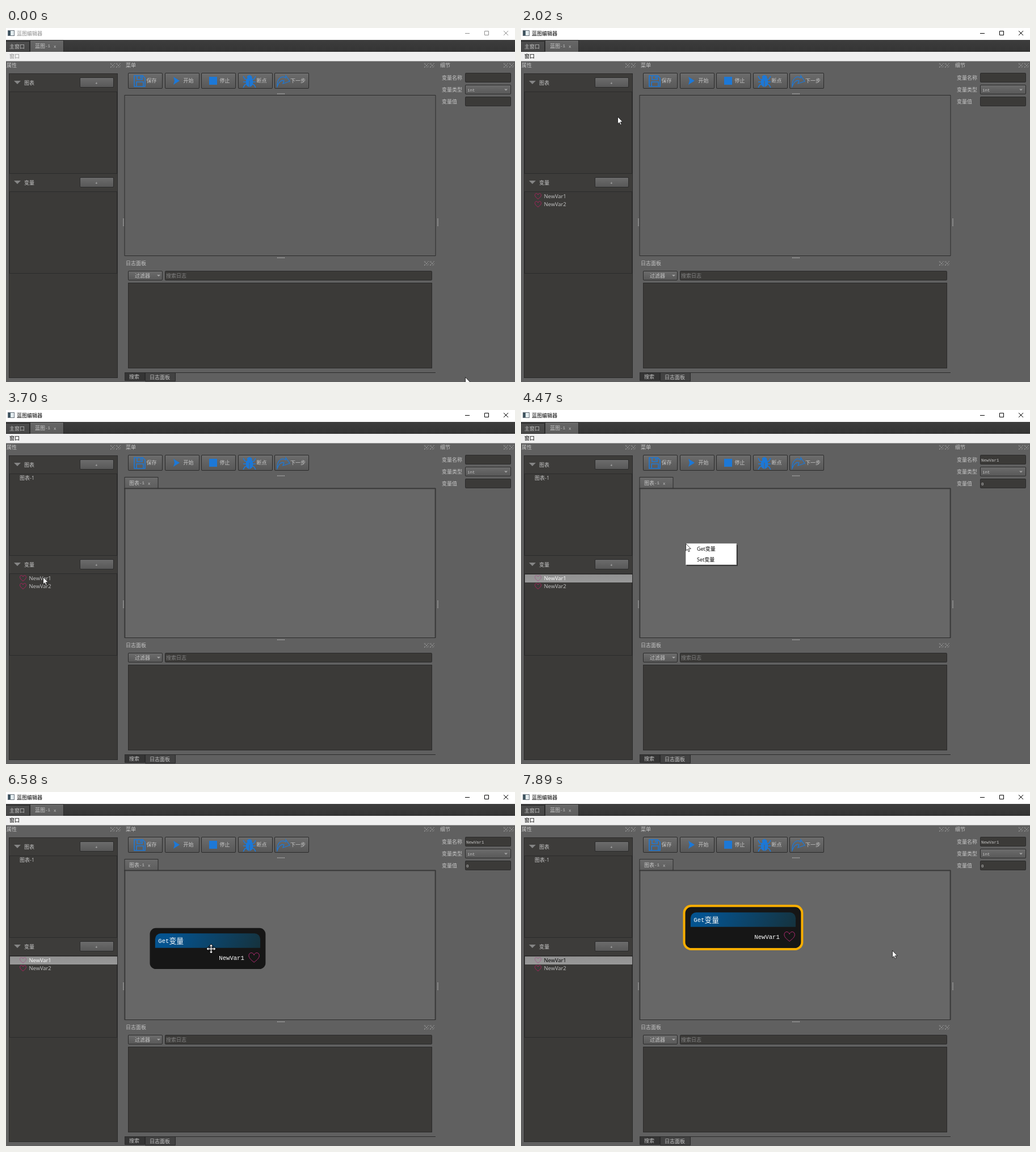
These frames come from a looping animation (897x624 px, 8000 ms). An HTML page with a canvas:

```html
<!DOCTYPE html>
<html lang="zh-CN">
<head>
<meta charset="utf-8">
<style>
html, body { margin: 0; width: 100%; height: 100%; overflow: hidden; background: #606060; }
canvas { display: block; }
</style>
</head>
<body>
<canvas id="stage" width="897" height="624"></canvas>
<script>
const ctx = document.getElementById('stage').getContext('2d');
const LOOP = 8000;
const CJK = '"Noto Sans CJK SC", "Noto Sans CJK", sans-serif';
const SANS = `"Open Sans", ${CJK}`;
const MONO = '"Liberation Mono", monospace';
const BACK = '#606060', DARK = '#3b3a38', EDGE = '#2b2b2b', LIGHT = '#c6c6c6', BLUE = '#1d78d6';

// Moments at which the interface reacts
const CUE = {
  activate: 1150, firstVar: 1230, pressAgain: 1540, secondVar: 1710, pressGraph: 2540, graph: 2620,
  select: 3780, details: 3860, menu: 4400, hover: 4620, node: 5240, zoom: 6100, grab: 6650, leave: 7290
};

// Pointer trips: each starts where the last one ended; bow bends the path sideways
const START = { x: 809, y: 615 };
const drag = { from: CUE.grab, to: 6990, x: 397, y: 239 };
const TRIPS = [
  { from: 20, to: 1000, x: 153, y: 266, bow: 330 },
  { from: CUE.secondVar, to: 2460, x: 155, y: 99, bow: 17 },
  { from: 2860, to: 3700, x: 65, y: 294, bow: -75 },
  { from: 3900, to: 4390, x: 290, y: 235 },
  { from: CUE.hover, to: 4780, x: 318, y: 243 },
  { from: 5420, to: 6020, x: 388, y: 239 },
  { from: 6350, to: 6560, x: 361, y: 276 },
  drag,
  { from: 6990, to: 7190, x: 470, y: 252 },
  { from: CUE.leave - 50, to: 7890, x: 654, y: 279 }
];

function progress(t, { from, to }) {
  const p = Math.min(1, Math.max(0, (t - from) / (to - from)));
  return p * (2 - p);
}

function pointerAt(t) {
  let { x, y } = START;
  for (const trip of TRIPS) {
    const p = progress(t, trip), dx = trip.x - x, dy = trip.y - y;
    const bend = (trip.bow || 0) * 4 * p * (1 - p) / Math.hypot(dx, dy);
    x += dx * p - dy * bend;
    y += dy * p + dx * bend;
    if (p < 1) break;
  }
  return [Math.round(x), Math.round(y)];
}

const between = (t, a, b) => t >= a && t < b;

function rect(x, y, w, h, color) {
  ctx.fillStyle = color;
  ctx.fillRect(x, y, w, h);
}

function round(x, y, w, h, r, fill) {
  ctx.fillStyle = fill;
  ctx.beginPath();
  ctx.roundRect(x, y, w, h, r);
  ctx.fill();
}

function framed(x, y, w, h, fill, r = 0, edge = EDGE) {
  round(x, y, w, h, r, edge);
  round(x + 1, y + 1, w - 2, h - 2, Math.max(0, r - 1), fill);
}

function vertical(y, h, top, bottom) {
  const g = ctx.createLinearGradient(0, y, 0, y + h);
  g.addColorStop(0, top);
  g.addColorStop(1, bottom);
  return g;
}

function stroke(path, color, width = 1) {
  ctx.strokeStyle = color;
  ctx.lineWidth = width;
  ctx.stroke(new Path2D(path));
}

function fill(path, color) {
  ctx.fillStyle = color;
  ctx.fill(new Path2D(path));
}

function text(s, x, cy, color = LIGHT, size = 9, family = SANS) {
  ctx.font = `${size}px ${family}`;
  ctx.fillStyle = color;
  ctx.fillText(s, x, cy + size * 0.37);
}

// Latin letters take half the width of a Chinese character
function gridText(s, x, cy, color = LIGHT, size = 9) {
  for (const run of s.match(/[\x20-\x7e]+|[^\x20-\x7e]+/g)) {
    const latin = run.charCodeAt(0) < 128;
    ctx.font = latin ? `${size / 1.2}px ${MONO}` : `${size}px ${CJK}`;
    ctx.fillStyle = color;
    ctx.fillText(run, x, cy + size * (latin ? 0.31 : 0.37));
    x += run.length * size * (latin ? 0.5 : 1);
  }
}

function button(x, y, w, h, pressed) {
  framed(x, y, w, h, vertical(y, h, pressed ? '#565656' : '#6d6d6d', '#575757'), 2);
}

function field(x, y, w, h) { framed(x, y, w, h, DARK, 2); }

function dropArrow(x, y, r, color = '#a5a5a5') {
  fill(`M${x - r} ${y}h${2 * r}l${-r} ${r}Z`, color);
}

function heart(cx, cy, w, color, width = 1) {
  const r = w / 2;
  ctx.save();
  ctx.translate(cx, cy);
  ctx.scale(r, r);
  for (const side of [1, -1]) {
    ctx.scale(side, 1);
    stroke('M0 .92C.6 .45 1 .1 1-.35C1-1 .2-1.1 0-.45', color, width / r);
  }
  ctx.restore();
}

function dockTitle(label, x, y, right) {
  text(label, x, y);
  for (const left of [right - 19, right - 9])
    for (let i = 0; i < 8; i += 2) {
      rect(left + i, y - 4 + i, 1, 1, '#b0b0b0');
      rect(left + 7 - i, y - 4 + i, 1, 1, '#b0b0b0');
      rect(left + i, i % 4 ? y - 4 : y + 3, 1, 1, '#8c8c8c');
      rect(i % 4 ? left : left + 7, y - 4 + i, 1, 1, '#8c8c8c');
    }
}

function grip(x, y, dx, dy) {
  for (let i = 0; i < 7; i++) rect(x + i * dx, y + i * dy, dx ? 1 : 2, dx ? 2 : 1, '#a8a8a8');
}

function drawTitleBar(active) {
  const ink = active ? '#000' : '#8e8e8e';
  rect(0, 0, 897, 21, '#fff');
  framed(3, 4, 12, 10, '#e4ecef', 0, '#66707a');
  rect(4, 5, 4, 8, '#3f5560');
  text('蓝图编辑器', 19, 9.5, ink, 9, CJK);
  stroke('M809 9.5h8M843.5 5.5h7v7h-7ZM877 5l8 8m0-8l-8 8', ink);

  rect(0, 21, 897, 21, vertical(21, 21, '#3d3d3d', '#343434'));
  framed(-1, 23, 43, 19, vertical(23, 19, '#4d4d4d', '#464646'), 1);
  framed(42, 21, 60, 23, vertical(21, 21, '#686868', '#5c5c5c'), 1);
  text('主窗口', 6, 32.5);
  gridText('蓝图-1', 51, 31.5);
  gridText('x', 84, 32);
  rect(0, 42, 897, 16.5, '#f0f0f0');
  text('窗口', 6, 49.5, ink);
}

function drawToolbar() {
  dockTitle('菜单', 211, 66, 756);
  ['保存', '开始', '停止', '断点', '下一步'].forEach((label, i) => {
    const x = Math.round(215 + i * 64.6);
    button(x, 79, 61, 28);
    text(label, x + (i < 4 ? 32.5 : 28), 93);
  });
  stroke('M226 84h15l4 4v15h-19ZM231 84v7h9v-7M230 103v-8h12v8M237.5 85v4', BLUE, 1.6);
  fill('M295 86l11 7-11 7 2-7Z', BLUE);
  rect(358, 86, 14, 14, BLUE);
  drawBug(429, 93);
  stroke('M478 103C477 89 486 83 493 88V84L500 94 488 98 490 93C485 91 481 95 478 103Z', BLUE, 1.3);
}

function drawBug(cx, cy) {
  ctx.fillStyle = BLUE;
  ctx.beginPath();
  ctx.ellipse(cx, cy + 2.5, 6.5, 8.5, 0, 0, 7);
  ctx.ellipse(cx, cy - 6, 4.5, 4, 0, Math.PI, 0);
  ctx.fill();
  for (const side of [-1, 1])
    for (const rise of [-5, 0, 5])
      stroke(`M${cx} ${cy + 2 + rise / 2}l${side * 8} ${rise / 2}l${side * 3} ${rise}`, BLUE, 1.6);
  rect(cx - 0.5, cy, 1, 11, BACK);
}

function drawSidebar(t) {
  const varPressed = between(t, CUE.activate, CUE.firstVar) || between(t, CUE.pressAgain, CUE.secondVar);
  dockTitle('属性', 1, 66, 203);
  framed(5, 80, 192, 537, DARK);
  drawSection('图表', 80, between(t, CUE.pressGraph, CUE.graph));
  drawSection('变量', 256, varPressed);
  if (t >= CUE.graph) text('图表-1', 24, 119.5);
  const selected = t >= CUE.select;
  if (selected) rect(7, 290, 189, 14, vertical(290, 14, '#919191', '#999'));
  [CUE.firstVar, CUE.secondVar].forEach((born, i) => {
    if (t < born) return;
    const y = 296.5 + i * 14, hot = selected && i === 0;
    heart(30, y, 11, hot ? '#a0608a' : '#a8245c');
    text(`NewVar${i + 1}`, 40.5, y, !hot ? LIGHT : t < CUE.grab ? '#fff' : '#000', 9.4);
  });
}

function drawSection(label, y, pressed) {
  rect(6, y + 1, 190, 31, '#3d3c3a');
  framed(6, y + 32, 190, 145, DARK);
  dropArrow(20, y + 13, 6, '#858585');
  text(label, 32, y + 16.5);
  button(130, y + 7, 60, 18, pressed);
  gridText('+', 157, y + 17);
}

function drawDetails(filled) {
  dockTitle('细节', 765, 66, 896);
  ['变量名称', '变量类型', '变量值'].forEach((label, i) => {
    const y = 88 + i * 21;
    text(label, 768, y);
    (i === 1 ? button : field)(809, y - 9, 81, 17);
  });
  gridText('int', 813, 109);
  dropArrow(881, 107.5, 3);
  if (filled) {
    gridText('NewVar1', 811, 88);
    gridText('0', 811, 130);
  }
}

function drawLog() {
  dockTitle('日志面板', 211, 415, 756);
  button(215, 428, 61, 17);
  text('过滤器', 227, 436.5);
  dropArrow(269, 435, 3);
  field(280, 428, 471, 17);
  text('搜索日志', 282, 436.5, '#858585');
  framed(215, 449, 536, 151, DARK);
  rect(209, 607, 548, 1, EDGE);
  framed(209, 607, 36, 15, '#353535', 1);
  framed(245, 607, 54, 16, '#424242', 1);
  text('搜索', 217, 615);
  text('日志面板', 253, 615.5);
}

function drawView(open) {
  if (!open) return framed(208.5, 118, 549, 284, BACK, 1);
  framed(208.5, 118, 60, 22, vertical(118, 20, '#6b6b6b', '#5e5e5e'), 1);
  gridText('图表-1', 217, 128.5);
  gridText('x', 250, 129);
  framed(208.5, 137.5, 549, 264.5, '#484848', 1);
  rect(210.5, 139.5, 545, 261.5, '#676767');
}

function drawNode(t) {
  const scale = 1.19 ** (t < CUE.zoom ? 0 : t < CUE.zoom + 80 ? 1 : 2);
  const moved = progress(t, drag);
  ctx.save();
  ctx.translate(388 - 95 * scale + 36 * moved, 237 + 2 * scale - 37 * moved);
  ctx.scale(scale, scale);
  if (t >= CUE.grab) round(-2.8, -2.8, 149.6, 56.6, 10, '#f8ae00');
  round(0, 0, 144, 51, 7.5, '#161616');
  const g = ctx.createLinearGradient(30, 0, 125, 45);
  g.addColorStop(0, '#04538f');
  g.addColorStop(1, '#15333f');
  round(6.6, 6.7, 130.8, 18, [7, 7, 0, 0], g);
  gridText('Get变量', 10.5, 15.6, '#fff');
  gridText('NewVar1', 86, 36.6, '#fff');
  heart(129.7, 36.6, 13, '#b02c72', 1 / scale);
  ctx.restore();
}

function drawMenu(hover) {
  rect(292, 238, 90, 37, 'rgba(0,0,0,.45)');
  framed(290, 235, 90, 38, '#fff', 0, '#d0d0d0');
  if (hover) rect(291, 236, 88, 18, '#91c9f7');
  text('Get变量', 310, 245, '#000');
  text('Set变量', 310, 263.5, '#000');
}

function fourWays(paint) {
  for (let i = 0; i < 4; i++) {
    paint('M-.7 0V-5H-2.8L0-7.8 2.8-5H.7V0Z');
    ctx.rotate(Math.PI / 2);
  }
}

function drawPointer(t) {
  ctx.save();
  ctx.translate(...pointerAt(t));
  if (between(t, CUE.node, CUE.leave)) {
    ctx.translate(0.5, 0.5);
    fourWays(path => stroke(path, '#000', 1.5));
    fourWays(path => fill(path, '#fff'));
  } else {
    const arrow = 'M.5 .5V13L3.3 10.4 5.2 14.8 7.2 14 5.3 9.7H9.3Z';
    fill(arrow, '#fff');
    stroke(arrow, '#111', 0.8);
  }
  ctx.restore();
}

function draw(t) {
  rect(0, 0, 897, 624, BACK);
  drawTitleBar(t >= CUE.activate);
  drawSidebar(t);
  drawToolbar();
  drawView(t >= CUE.graph);
  drawLog();
  drawDetails(t >= CUE.details);
  grip(478, 115, 2, 0);
  grip(478, 404, 2, 0);
  grip(206, 336, 0, 2);
  grip(760, 336, 0, 2);
  if (between(t, CUE.menu, CUE.node)) drawMenu(t >= CUE.hover);
  if (t >= CUE.node) drawNode(t);
  drawPointer(t);
}

function tick() {
  draw(performance.now() % LOOP);
  requestAnimationFrame(tick);
}
tick();
</script>
</body>
</html>
```
